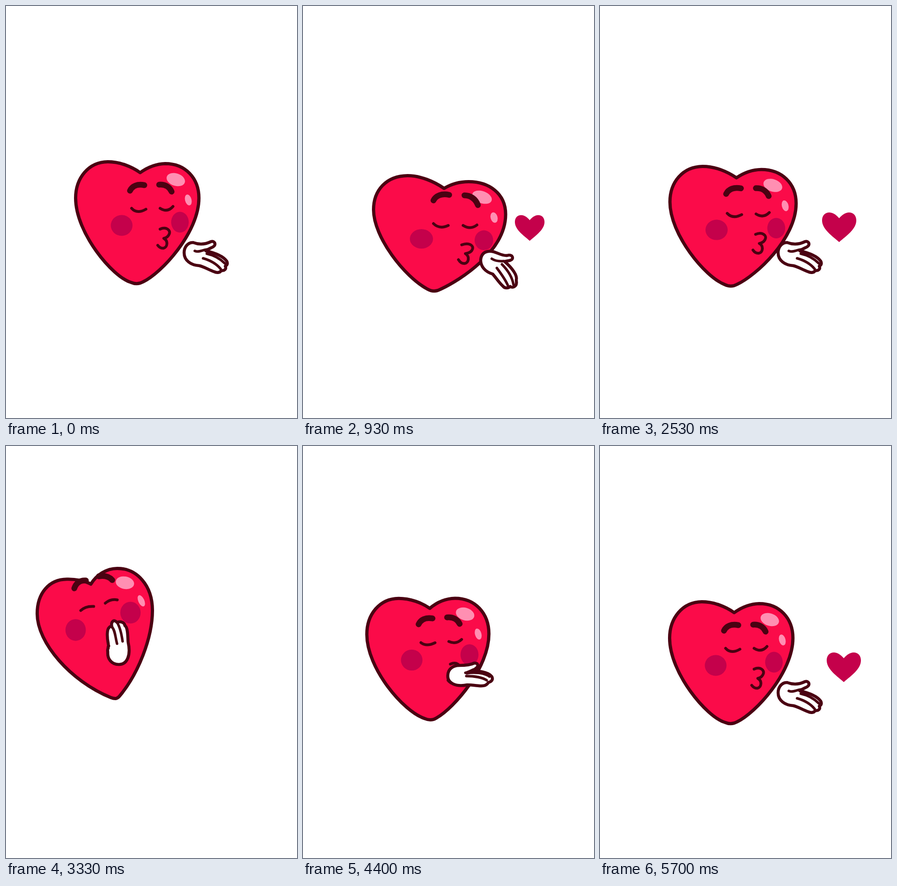
These frames come from a looping animation (629x890 px, 5.73 s). An HTML page:

```html
<!DOCTYPE html>
<html lang="en">
<head>
<meta charset="utf-8">
<title>Heart blowing a kiss</title>
<style>
  html, body { margin: 0; width: 100%; height: 100%; overflow: hidden; background: #fff; }
  svg { display: block; width: 100%; height: 100%; }
  .ink { fill: none; stroke: #4a0212; stroke-linecap: round; stroke-linejoin: round; }
  .blush { fill: #c4014b; }
  .shine { fill: #ff8fb2; }
</style>
</head>
<body>
<svg id="stage" viewBox="0 0 629 890"></svg>
<script>
const LOOP = 5730, CYCLE = 43;
const svg = document.getElementById('stage');

function add(tag, attrs) {
  const el = document.createElementNS('http://www.w3.org/2000/svg', tag);
  for (const name in attrs) el.setAttribute(name, attrs[name]);
  return svg.appendChild(el);
}

// Each part lists its poses: rest, lean back, squash (and frown for the brows).
const bodyParts = [];
const handParts = [];

function line(list, width, poses, fill = 'none') {
  const el = add('path', { class: 'ink', 'stroke-width': width, style: 'fill:' + fill });
  list.push({ el, poses, numbers: poses.map(p => p.match(/-?[\d.]+/g).map(Number)) });
}

// Oval poses: cx, cy, rx, ry, angle.
function oval(name, ...numbers) {
  bodyParts.push({ el: add('ellipse', { class: name }), numbers });
}

line(bodyParts, 7, [
  `M290 360 C272 347 246 336.5 220 336.5 C178 337 150.5 372 150.5 415 C150.5 490 230 585 270 597
   C279 601 287 601 296 596 C335 578 417 490 417 415 C417 372 388 340.5 344 340.5 C322 341 304 350 290 360Z`,
  `M183 298 C170 291 150 287 131 287.5 C92 288 67 318 67 362 C67 425 140 508 226 543
   C236 547 241 546 246 539 C285 492 316 415 316 355 C316 300 282 264 240 264 C216 264 194 279 183 298Z`,
  `M305 394 C283 379 254 366.5 226 366.5 C180 367 152.5 398 152.5 440 C152.5 500 220 585 268 611
   C278 617 288 617 297 612 C340 592 438 530 438 450 C438 405 402 379.5 358 379.5 C338 379.5 320 385 305 394Z`
], '#fb0b49');

oval('shine', [367, 375, 20.5, 13.5, 18], [256.5, 295, 20, 13.5, 10], [387, 413, 22, 13, 20]);
oval('shine', [394, 419, 7, 12, -15], [292, 334, 6.5, 13, -25], [413, 457, 7.5, 11.5, -15]);
oval('blush', [250, 474, 23.5, 22.5, 0], [150, 397, 22, 23.5, 0], [256, 503, 25, 21, 0]);
oval('blush', [376, 467, 19, 22.5, 0], [268.5, 359.5, 22, 23.5, 0], [391, 506, 20, 21.5, 0]);

// Brows
line(bodyParts, 12.5, [
  'M268 399 C273 389 284 384 299 387',
  'M147 307 C151 295 160 289 172 290',
  'M282 420 C287 410 300 404 316 408',
  'M147 309 C153 303 162 296 174 292'
]);
line(bodyParts, 12.5, [
  'M331 386 C343 385 353 390 358 401',
  'M200 281 C211 279 222 281 229 289',
  'M349 409 C361 409 373 416 378 430',
  'M199 285 C209 283 220 285 229 290'
]);

// Eyes
line(bodyParts, 6, [
  'M271.5 437 Q283 450 302.5 439',
  'M161 355 Q171 345 189 346',
  'M282 470 Q295 483 314 474'
]);
line(bodyParts, 6, [
  'M333 437 Q349 447 361 433',
  'M214 339 Q226 329 240 332',
  'M346 474 Q362 484 376 473'
]);

// Mouth
line(bodyParts, 6, [
  'M333 482 C346 476 356 484 353 492 C351 498 346 501 341 502 C351 507 349 521 341 523 C335 524 331 521 328 517',
  'M236 410 C249 404 259 412 256 420 C254 426 249 429 244 430 C254 435 252 449 244 451 C238 452 234 449 231 445',
  'M343 516 C358 510 370 517 366 526 C364 532 357 534 351 535 C361 541 358 555 350 556 C343 557 339 553 336 548'
]);

const kiss = add('path', {
  class: 'blush',
  d: `M0 -19.5 C-6 -27 -14 -32 -21 -32 C-31 -32 -37 -25 -37 -15 C-37 4 -16 18 0 32
      C16 18 37 4 37 -15 C37 -25 31 -32 21 -32 C14 -32 6 -27 0 -19.5Z`
});

// Hand poses: rest, flat, over the mouth, hanging down.
line(handParts, 6.5, [
  `M405 511 C420 517 433 514 443 509 C451 506 455 516 448 520 C443 523 438 524 432 529
   C450 533 468 539 477 551 C480 556 478 560 474 562 C477 568 472 573 465 571 C464 576 456 577 450 574
   C438 570 430 564 418 561 C400 560 385 550 385 533 C385 520 394 510 405 511Z`,
  `M338 474 C350 474 362 473 370 469 C379 468 380 476 374 480 C370 484 364 486 360 488
   C376 484 400 488 408 498 C411 503 409 508 403 510 C400 511 400 511 400 512 C396 518 388 519 380 518
   C370 517 362 516 355 516 C330 521 312 512 313 496 C313 482 324 474 338 474Z`,
  `M220 445 C219 440 220 438 221 436 C220 434 221 433 222 432 C221 430 221 429 221 427
   C218 412 218 396 223 392 C225 389 227 389 229 391 C226 380 233 373 240 381 C248 378 256 381 257 388
   C264 392 263 415 264 424 C270 450 263 472 244 472 C228 472 219 460 220 445Z`,
  `M401 530 C416 528 426 540 441 539 C454 535 456 547 449 549 C445 551 441 550 436 552
   C452 566 464 582 461 592 C462 598 461 604 457 606 C455 608 450 608 448 606 C444 610 436 610 433 606
   C424 598 418 588 410 579 C393 574 384 562 384 549 C385 537 391 531 401 530Z`
], '#fff');
line(handParts, 5.5, [
  'M408 529 C416 533 424 527 434 526',
  'M351 490 C356 489 362 486 368 483',
  'M221 437 C221 436 221 434 222 432',
  'M408 546 C416 551 424 552 434 551'
]);
line(handParts, 5.5, [
  'M434 535 C448 538 462 545 473 556',
  'M354 491 C370 488 392 490 403 498',
  'M229 391 C236 398 236 412 240 427',
  'M430 558 C442 570 452 585 455 602'
]);
line(handParts, 5.5, [
  'M426 545 C440 549 455 557 464 568',
  'M353 497 C370 497 388 500 397 506',
  'M240 381 C247 392 250 408 252 422',
  'M419 566 C428 578 438 592 443 604'
]);

// Tracks: tick followed by the values at that tick.
const leanTrack = [[0, 0], [2, .04], [3, .15], [4, .43], [5, .66], [6, .8], [8, .92], [11, .98],
  [15, 1], [20, 1], [22, .82], [23, .5], [24, .2], [25, 0]];
const squashTrack = [[18, 0], [20, .2], [22, .65], [24, 1.4], [25, 1.7], [26, 1.55], [27, 1.25],
  [28, 1], [29, .9], [31, .58], [33, .33], [35, .13], [37, .03], [39, 0]];
const frownTrack = [[14, 0], [15, 1], [19, 1], [22, 0]];
const handTrack = [[0, 0, 0, 0], [1, .2, 0, 0], [2, .6, 0, 0], [3, 1, 0, 0], [4, .6, .4, 0],
  [5, .25, .75, 0], [6, .05, .95, 0], [8, 0, 1, 0], [20, 0, 1, 0], [22, .3, .55, .15],
  [23, .2, .2, .6], [24, 0, 0, 1], [25, 0, 0, 1.15], [28, 0, 0, 1], [29, 0, 0, .9],
  [31, 0, 0, .4], [33, 0, 0, 0]];
// x, y, width
const kissTrack = [[25, 400, 505, 10], [26, 432, 492, 30], [27, 465, 483, 50], [28, 490, 479.5, 64],
  [29, 500, 479, 68], [31, 510, 478.5, 72], [33, 517, 478, 74], [36, 527, 478, 74],
  [38, 529, 478, 74], [42, 527, 478, 74]];

function sample(track, tick) {
  const next = track.findIndex(key => key[0] > tick);
  if (next === 0) return track[0].slice(1);
  if (next < 0) return track[track.length - 1].slice(1);
  const a = track[next - 1], b = track[next];
  const u = (tick - a[0]) / (b[0] - a[0]);
  return a.slice(1).map((v, i) => v + (b[i + 1] - v) * u);
}

function blend([base, ...others], weights) {
  return base.map((v, i) => others.reduce((sum, pose, k) => sum + (pose[i] - v) * weights[k], v));
}

function show(part, weights) {
  const n = blend(part.numbers, weights);
  if (part.poses) {
    let i = 0;
    part.el.setAttribute('d', part.poses[0].replace(/-?[\d.]+/g, () => n[i++].toFixed(2)));
  } else {
    const [cx, cy, rx, ry, angle] = n;
    part.el.setAttribute('rx', rx);
    part.el.setAttribute('ry', ry);
    part.el.setAttribute('transform', `translate(${cx} ${cy}) rotate(${angle})`);
  }
}

function draw(ms) {
  let step = Math.floor((ms % LOOP + 4) * 0.03);
  if (step % 6 === 1) step--; // every sixth step is held
  const tick = step % CYCLE;

  const [lean] = sample(leanTrack, tick);
  const [squash] = sample(squashTrack, tick);
  const frown = sample(frownTrack, tick)[0];
  bodyParts.forEach(part => {
    const frowns = part.numbers.length > 3;
    show(part, frowns ? [lean * (1 - frown), squash, lean * frown] : [lean, squash]);
  });

  const hand = sample(handTrack, tick);
  handParts.forEach(part => show(part, hand));

  const [x, y, width] = sample(kissTrack, tick);
  kiss.setAttribute('visibility', tick >= 25 ? 'visible' : 'hidden');
  kiss.setAttribute('transform', `translate(${x} ${y}) scale(${width / 74})`);
}

const start = performance.now();
function run() {
  draw(performance.now() - start);
  requestAnimationFrame(run);
}
run();
</script>
</body>
</html>
```
